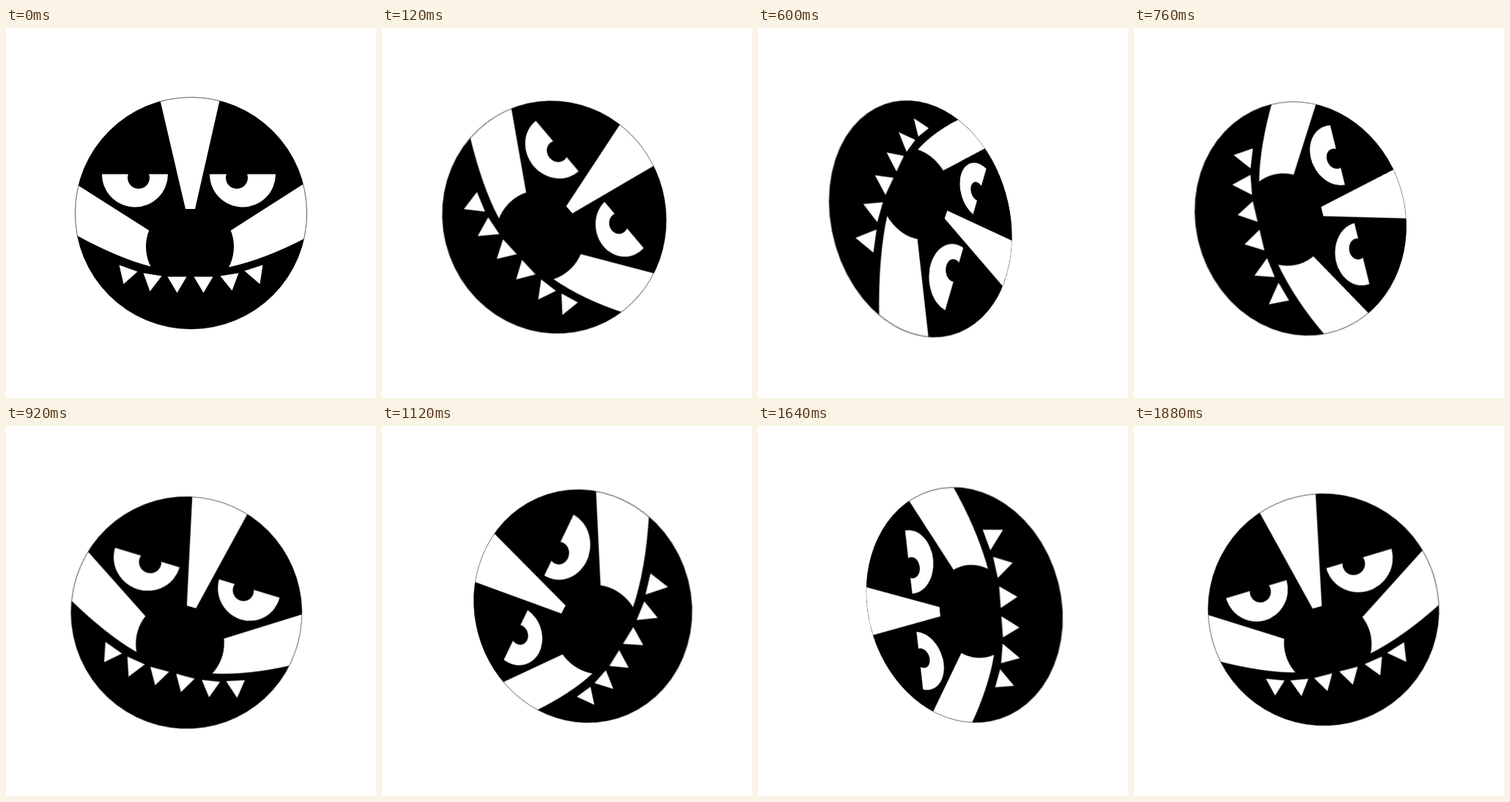
Recreate the animation shown at these times as an HTML page. Size 505x505 px, loop 1.92 s.

```html
<!DOCTYPE html>
<html>
<head>
<meta charset="utf-8">
<title>Swinging mask</title>
<style>
  html, body { margin: 0; width: 100%; height: 100%; overflow: hidden; background: #fff; }
  #stage { width: 505px; height: 505px; perspective: 425px; }
  #mask { display: block; will-change: transform; }
</style>
</head>
<body>
<div id="stage">
  <svg id="mask" width="505" height="505" viewBox="-.5 -.5 505 505">
    <clipPath id="disc"><circle cx="252" cy="252.2" r="158.4"/></clipPath>
    <g clip-path="url(#disc)" fill="#fff">
      <circle cx="252" cy="252.2" r="158.4" fill="#000"/>
      <!-- cheeks, cut by the round snout -->
      <path d="M85 206L195 276L215 300L197 325Q150 313 85 276.5ZM415 206.5L306 276L285 300L303 326Q355 315 418 281Z"/>
      <circle cx="250.5" cy="298" r="60" fill="#000"/>
      <path d="M208 90L244.5 246.5H257.5L293 90Z"/>
      <!-- eyes -->
      <path d="M130.5 199a45 45 0 0 0 90 0ZM277.5 199a45 45 0 0 0 90 0Z"/>
      <circle cx="180.5" cy="204" r="15" fill="#000"/>
      <circle cx="314.5" cy="204" r="15" fill="#000"/>
      <!-- teeth -->
      <path d="M154 323L179 332L160 349ZM187 334L212 338L196 359ZM220 339H246L233 361ZM256 339H282L269 361ZM292 338L317 334L308 358ZM325 331L350 323L346 349Z"/>
    </g>
    <circle cx="252" cy="252.2" r="158.1" fill="none" stroke="#000" stroke-width=".6"/>
  </svg>
</div>
<script>
  const LOOP = 1920, STEP = 40;
  const mask = document.getElementById('mask');
  const start = performance.now();

  function draw() {
    const t = Math.floor((performance.now() - start) % LOOP / STEP) * STEP;
    const swing = Math.sin(2 * Math.PI * t / LOOP);
    mask.style.transform =
      `rotateX(${15.3 * swing}deg) rotateY(${46 * swing}deg) rotateZ(${122.3 * swing}deg)`;
    requestAnimationFrame(draw);
  }
  draw();
</script>
</body>
</html>
```
